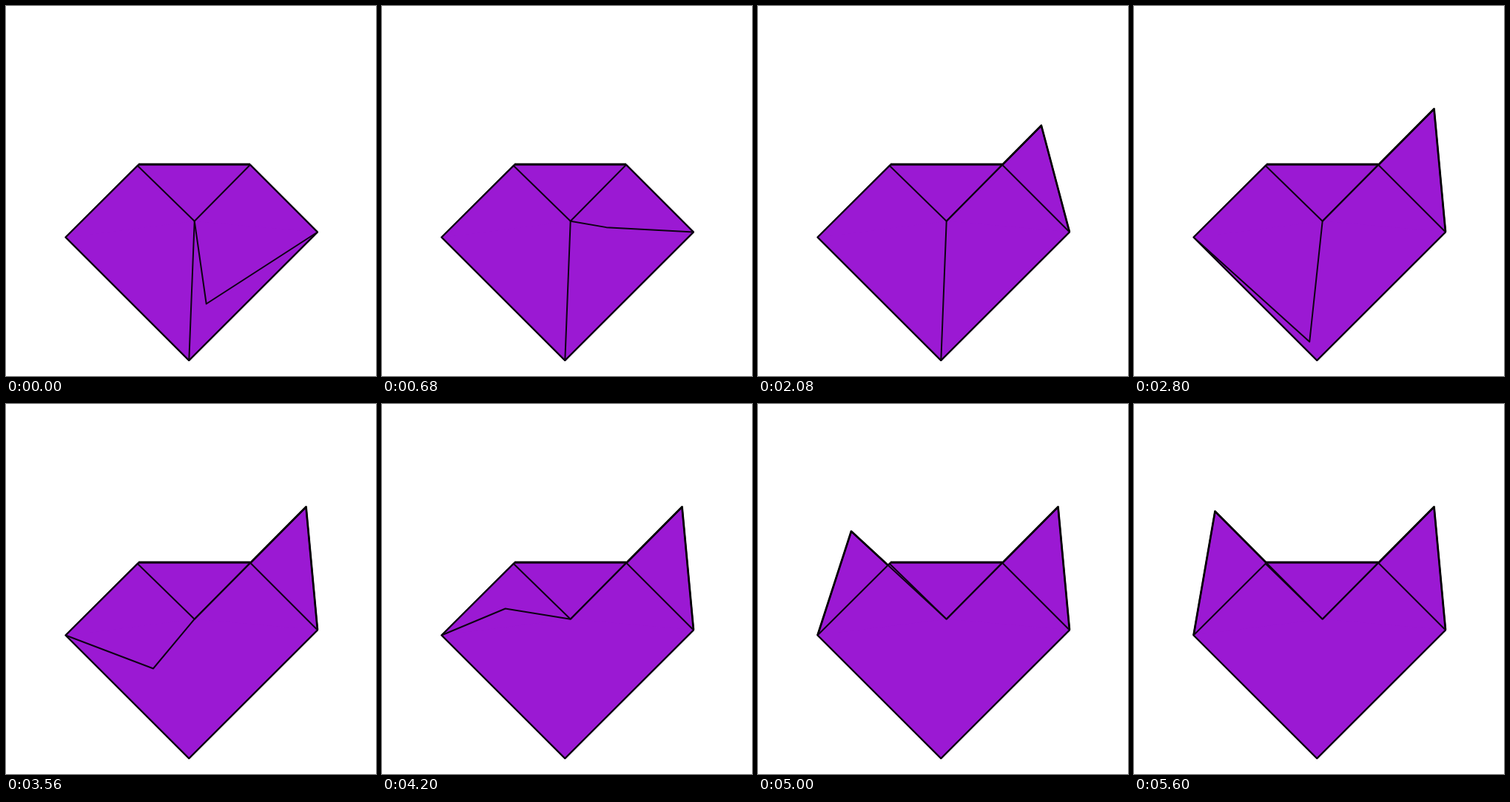
Write an HTML page that moves like this. It is 500x500 px and loops after 5.8 s.

```html
<!DOCTYPE html>
<html lang="en">
<head>
<meta charset="utf-8">
<title>Paper folding</title>
<style>
  html, body { margin: 0; width: 100%; height: 100%; overflow: hidden; background: #fff; }
  svg { display: block; width: 100%; height: 100%; }
  path { fill: none; stroke: #0c0212; stroke-width: 2; stroke-linejoin: round; }
  .paper { fill: #9b19d3; }
  .edge { stroke: #000; stroke-width: 2.7; }
</style>
</head>
<body>
<svg viewBox="0 0 500 500">
  <defs>
    <clipPath id="outside">
      <path d="M0 0H500V305.5H421L330 214H179L80.5 312.5H0Z"/>
    </clipPath>
  </defs>
  <path class="paper" d="M179 214.5L80.5 312.5L247.3 479L421 305.5L330 214.5Z"/>
  <path class="paper" id="leftFlap"/>
  <path class="paper" id="rightFlap"/>
  <g clip-path="url(#outside)">
    <path class="edge" id="leftEar"/>
    <path class="edge" id="rightEar"/>
  </g>
  <path d="M179 214.5L80.5 312.5L247.3 479L421 305.5L330 214.5L254.7 290.7L178 216"/>
  <path class="edge" d="M179 213.8H330"/>
</svg>
<script>
const LOOP = 5800, STEP = 40;
const CENTER = [254.7, 290.7], LEFT = [80.5, 312.5], RIGHT = [421, 305.5];

// Flap tip positions as [time, x, y]
const rightTip = [[0, 270.7, 402.5], [1240, 330, 214], [2440, 405.5, 139]];
const leftTip = [[2600, 247.3, 479], [4200, 166.7, 276.5], [5000, 126, 172], [5600, 109.5, 145]];

const byId = id => document.getElementById(id);
const left = [byId('leftFlap'), byId('leftEar')];
const right = [byId('rightFlap'), byId('rightEar')];

function tipAt(keys, time) {
  if (time <= keys[0][0]) return keys[0].slice(1);
  for (let i = 1; i < keys.length; i++) {
    const [t0, x0, y0] = keys[i - 1], [t1, x1, y1] = keys[i];
    if (time <= t1) {
      const k = (time - t0) / (t1 - t0);
      return [x0 + (x1 - x0) * k, y0 + (y1 - y0) * k];
    }
  }
  return keys[keys.length - 1].slice(1);
}

function drawFlap(paths, tip, side) {
  const d = 'M' + [CENTER, tip, side].map(p => p.join(' ')).join('L');
  paths.forEach(path => path.setAttribute('d', d));
}

function render(elapsed) {
  const time = Math.floor((elapsed % LOOP) / STEP) * STEP;
  drawFlap(left, tipAt(leftTip, time), LEFT);
  drawFlap(right, tipAt(rightTip, time), RIGHT);
}

const start = performance.now();
function tick() {
  render(performance.now() - start);
  requestAnimationFrame(tick);
}
tick();
</script>
</body>
</html>
```
